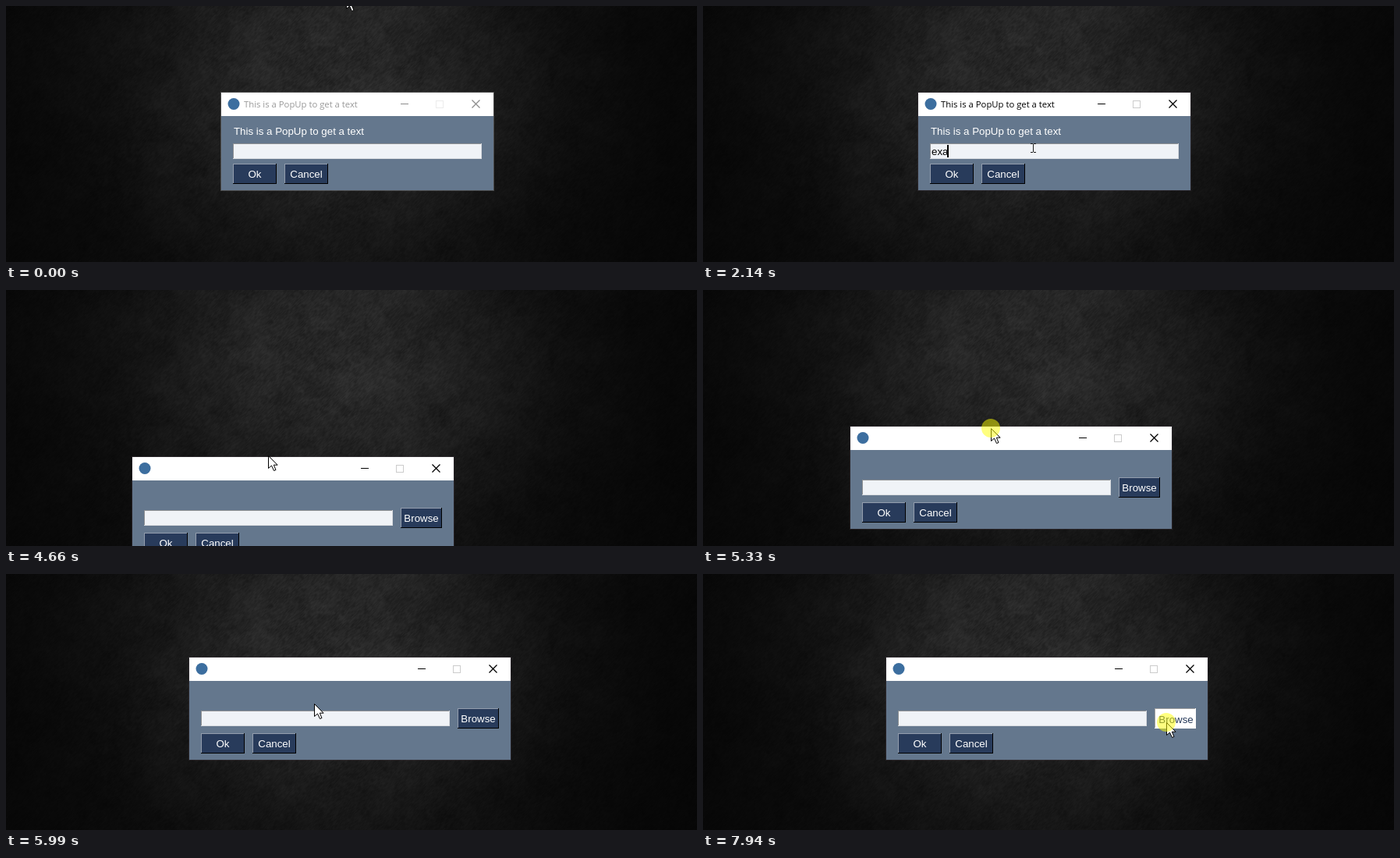
Write an HTML page with a canvas that moves like this. It is 886x328 px and loops after 8 s.

```html
<!DOCTYPE html>
<html lang="en">
<head>
<meta charset="utf-8">
<title>Popup dialogs</title>
<style>
  html, body { margin: 0; width: 100%; height: 100%; overflow: hidden; background: #0a0a0a; }
  canvas { display: block; width: 886px; height: 328px; }
</style>
</head>
<body>
<canvas id="stage" width="886" height="328"></canvas>
<script>
const W = 886, H = 328, LOOP = 8000;
const ctx = document.getElementById('stage').getContext('2d');

const UI_FONT = '13.3px "Liberation Sans", Arial, sans-serif';
const TITLE_FONT = '11.3px "Open Sans", "Noto Sans", sans-serif';
const NAVY = '#283b5b', SLATE = '#64778d', FIELD = '#f0f3f7';
const FOCUS = 880, OK_CLICK = 4310, DRAG = 5220, BROWSE_CLICK = 7940;

const clamp = (v, lo, hi) => Math.min(hi, Math.max(lo, v));
const ramp = (t, a, b) => clamp((t - a) / (b - a), 0, 1);
const mix = (a, b, k) => a + (b - a) * k;
const ease = s => s * s * s * (s * (6 * s - 15) + 10);
const inside = ([px, py], x, y, w, h) => px >= x && px < x + w && py >= y && py < y + h;

// The pointer glides from each stop to the next; bend bows the path sideways.
const stops = [
  { from: 80, to: 730, x: 423, y: 182, bend: -.14 },
  { from: 3500, to: 4280, x: 340, y: 210 },
  { from: 4400, to: 4500, x: 336, y: 212 },
  { from: 5000, to: 5030, x: 342, y: 216 },
  { from: DRAG, to: 5480, x: 415, y: 109 },
  { from: 5750, to: 6350, x: 296, y: 231, bend: -.35 },
  { from: 6350, to: 6550, x: 309, y: 215 },
  { from: 6570, to: 6830, x: 345, y: 208 },
  { from: 6830, to: 7380, x: 567, y: 196 },
  { from: 7380, to: 7560, x: 631, y: 191 },
  { from: 7560, to: 7920, x: 594, y: 190 }
];

function pointerAt(t) {
  let x = 436, y = -13;
  for (const stop of stops) {
    if (t < stop.from) break;
    const k = ease(ramp(t, stop.from, stop.to));
    const dx = stop.x - x, dy = stop.y - y;
    const bow = 2 * k * (1 - k) * (stop.bend || 0);
    x += dx * k - dy * bow;
    y += dy * k + dx * bow;
  }
  return [Math.round(x), Math.round(y)];
}

function isPressed(t) {
  const tapped = at => t >= at && t < at + 80;
  return tapped(FOCUS) || tapped(OK_CLICK) || tapped(BROWSE_CLICK) || (t >= DRAG && t < 5510);
}

function hash(x, y) {
  let h = Math.imul(x, 374761393) + Math.imul(y, 668265263);
  h = Math.imul(h ^ (h >>> 13), 1274126177);
  return ((h ^ (h >>> 16)) >>> 0) / 4294967296;
}

function noise(x, y) {
  const i = Math.floor(x), j = Math.floor(y);
  let u = x - i, v = y - j;
  u *= u * (3 - 2 * u);
  v *= v * (3 - 2 * v);
  return mix(mix(hash(i, j), hash(i + 1, j), u), mix(hash(i, j + 1), hash(i + 1, j + 1), u), v);
}

// Dark scuffed wall: a soft glow, blotches and fine diagonal scratches.
function makeWall() {
  const wall = document.createElement('canvas');
  wall.width = W;
  wall.height = H;
  const c = wall.getContext('2d'), img = c.createImageData(W, H);
  for (let y = 0; y < H; y++) for (let x = 0; x < W; x++) {
    const glow = 6 + 35 * Math.exp(-(((x - 420) / 260) ** 2) - ((y - 90) / 245) ** 2);
    const blotch = .4 * noise(x / 40, y / 40) + .35 * noise(x / 14 + 90, y / 14) + .25 * noise(x / 4, y / 4 + 50);
    const scratch = noise((x - y) / 5 + 300, (x + y) / 1.7) - .5;
    const value = glow * (.72 + .56 * blotch + .28 * scratch);
    const p = (y * W + x) * 4;
    img.data[p] = img.data[p + 1] = img.data[p + 2] = value;
    img.data[p + 3] = 255;
  }
  c.putImageData(img, 0, 0);
  return wall;
}
const wall = makeWall();

function rect(x, y, w, h, color) {
  ctx.fillStyle = color;
  ctx.fillRect(x, y, w, h);
}

function disc(x, y, r, color) {
  ctx.fillStyle = color;
  ctx.beginPath();
  ctx.arc(x, y, r, 0, 2 * Math.PI);
  ctx.fill();
}

function text(str, x, y, color, font = UI_FONT, align = 'left') {
  ctx.font = font;
  ctx.textAlign = align;
  ctx.fillStyle = color;
  ctx.fillText(str, x, y);
}

function bevel(x, y, w, h, topLeft, bottomRight, fill) {
  rect(x, y, w, h, bottomRight);
  rect(x, y, w - 1, h - 1, topLeft);
  rect(x + 1, y + 1, w - 2, h - 2, fill);
}

// press is the pointer position while the mouse button is down.
function button(label, x, y, w, press) {
  const down = press && inside(press, x, y, w, 26);
  if (down) bevel(x, y, w, 26, '#a0a0a0', '#fff', '#fff');
  else bevel(x, y, w, 26, '#939dad', '#000', NAVY);
  const shift = down ? 1 : 0;
  text(label, x + w / 2 + shift, y + 18 + shift, down ? NAVY : '#fff', UI_FONT, 'center');
}

function field(x, y) {
  bevel(x, y, 319, 20, '#909294', '#d8dbdf', FIELD);
}

function frame(x, y, w, h, active, title) {
  const ink = active ? '#000' : '#8c8c8c', r = x + w;
  ctx.lineWidth = 1;
  ctx.strokeStyle = active ? 'rgba(70, 62, 70, .4)' : 'rgba(128, 128, 128, .5)';
  ctx.strokeRect(x - .5, y - .5, w + 1, h + 1);
  rect(x, y, w, h, SLATE);
  rect(x, y, w, 30, '#fff');
  disc(x + 16, y + 14.5, 7.5, '#3c6e9f');
  text(title, x + 29, y + 19, active ? '#000' : '#999', TITLE_FONT);

  rect(r - 119, y + 14, 10, 1, ink);
  ctx.strokeStyle = active ? '#ccc' : '#ececec';
  ctx.strokeRect(r - 73.5, y + 10.5, 9, 9);
  ctx.strokeStyle = ink;
  ctx.lineWidth = 1.3;
  ctx.beginPath();
  for (const side of [-5, 5]) {
    ctx.moveTo(r - 22.5 + side, y + 9.5);
    ctx.lineTo(r - 22.5 - side, y + 19.5);
  }
  ctx.stroke();
}

// Three letters, a pause, then the rest at a quicker pace.
function typedAt(t) {
  const count = clamp(Math.floor((t - 1530) / 200), 0, 3) + clamp(Math.floor((t - 2380) / 130), 0, 4);
  return 'example'.slice(0, count);
}

const caretShown = t => t >= FOCUS && (t - 876) % 886 < 588;

function textDialog(t, press) {
  const x = 276, y = 111, title = 'This is a PopUp to get a text';
  frame(x, y, 349, 125, t >= FOCUS, title);
  text(title, x + 16, y + 54, '#fff');
  field(x + 15, y + 65);
  const typed = typedAt(t);
  text(typed, x + 17, y + 80, '#000');
  if (caretShown(t)) rect(x + 16 + Math.round(ctx.measureText(typed).width), y + 67, 2, 16, '#000');
  button('Ok', x + 15, y + 91, 56, press);
  button('Cancel', x + 81, y + 91, 56, press);
}

function fileDialog(x, y, press) {
  frame(x, y, 412, 131, true, '');
  field(x + 15, y + 68);
  button('Browse', x + 344, y + 65, 53, press);
  button('Ok', x + 15, y + 97, 56, press);
  button('Cancel', x + 81, y + 97, 56, press);
}

// Fade with a slight zoom around the window centre.
function faded(k, cx, cy, paint) {
  if (k <= 0) return;
  const scale = mix(.92, 1, k);
  ctx.save();
  ctx.globalAlpha = k;
  ctx.translate(cx, cy);
  ctx.scale(scale, scale);
  ctx.translate(-cx, -cy);
  paint();
  ctx.restore();
}

function arrow(x, y) {
  const shape = [[0, 0], [0, 16], [4, 12.5], [7, 19], [9.5, 18], [6.8, 11.7], [11.6, 11.7]];
  ctx.beginPath();
  shape.forEach(([dx, dy]) => ctx.lineTo(x + .5 + dx, y + .5 + dy));
  ctx.closePath();
  ctx.fillStyle = '#fff';
  ctx.fill();
  ctx.strokeStyle = '#000';
  ctx.lineWidth = 1;
  ctx.stroke();
}

function beam(x, y) {
  const ink = '#1c1c1c';
  for (const dy of [-6, 5]) {
    rect(x - 3, y + dy, 3, 1, ink);
    rect(x + 1, y + dy, 3, 1, ink);
  }
  rect(x, y - 5, 1, 10, ink);
}

function draw(t) {
  const pointer = pointerAt(t), press = isPressed(t) && pointer;
  const [gripX, gripY] = pointerAt(clamp(t, DRAG, 5500));
  const x = gripX - 180, y = gripY - 2;

  ctx.drawImage(wall, 0, 0);
  faded(1 - ramp(t, 4400, 4540), 450, 174, () => textDialog(t, press));
  faded(ramp(t, 4480, 4650), x + 206, y + 65, () => fileDialog(x, y, press));

  const [fieldX, fieldY] = t < 4450 ? [291, 176] : [x + 15, y + 68];
  const pointerShape = inside(pointer, fieldX, fieldY, 319, 20) ? beam : arrow;
  pointerShape(...pointer);
  if (press) disc(...pointer, 12, 'rgba(255, 255, 0, .5)');
}

const start = performance.now();
function tick() {
  draw((performance.now() - start) % LOOP);
  requestAnimationFrame(tick);
}
tick();
</script>
</body>
</html>
```
